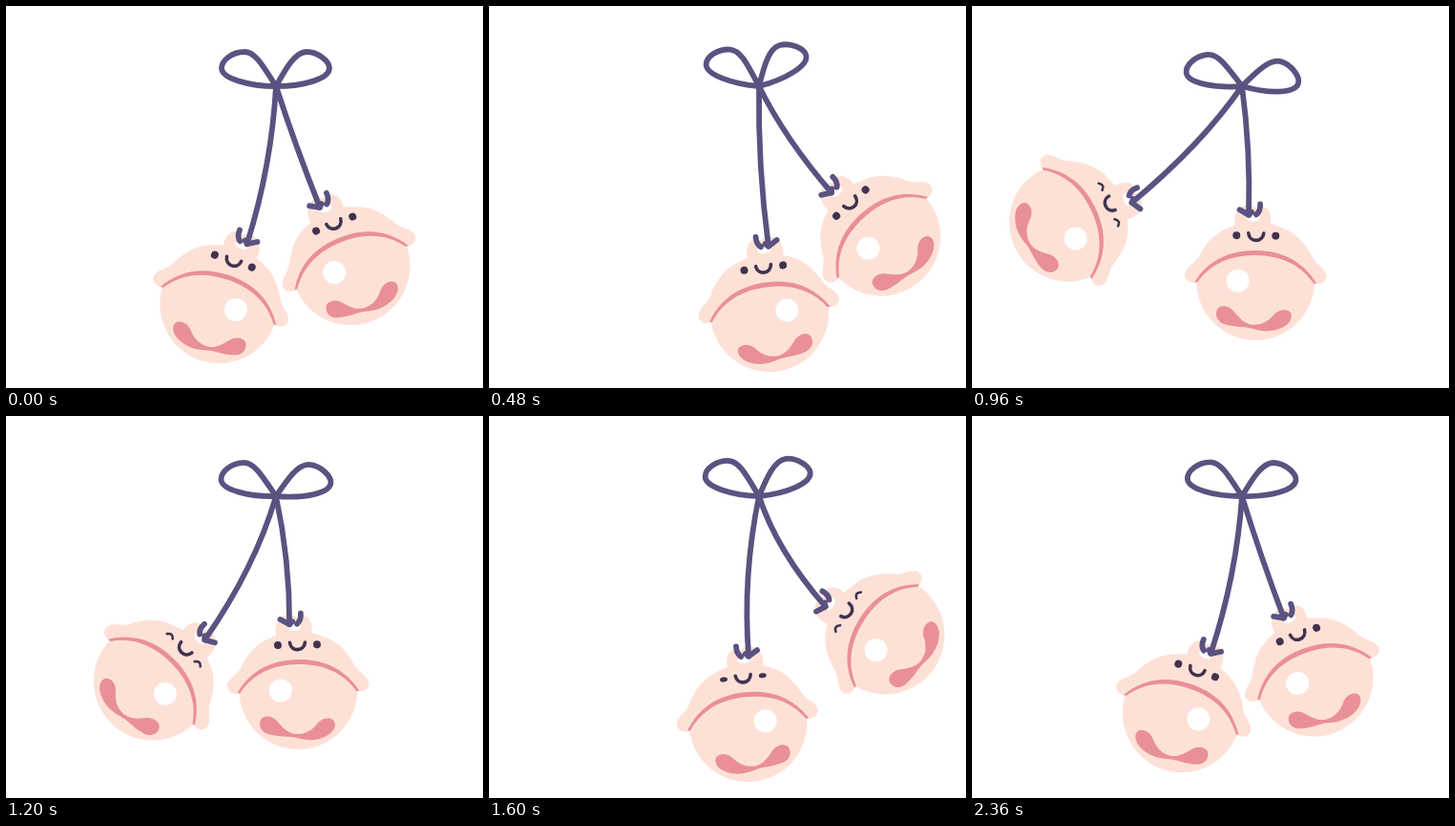
An HTML page for the animation above (2640 ms loop, 500 by 400 pixels).

```html
<!DOCTYPE html>
<html lang="en">
<head>
<meta charset="utf-8">
<title>Swinging bells</title>
<style>
  html, body { margin: 0; width: 100%; height: 100%; overflow: hidden; background: #fff; }
  svg { display: block; width: 100%; height: 100%; }
  .cord { fill: none; stroke: #5a5280; stroke-width: 5.8; stroke-linecap: round; stroke-linejoin: round; }
  .skin { fill: #fde1d7; }
  .pink { fill: #e98f98; }
  .ink { fill: #41334f; }
  .line { fill: none; stroke: #41334f; stroke-linecap: round; }
</style>
</head>
<body>
<svg id="stage" viewBox="0 0 500 400"></svg>
<script>
const LOOP = 2640, CYCLE = 2400, STEP = 40;
const KNOT = { x: 283, y: 84 };

// Key poses in degrees; every track has one value per key time.
const TIMES = [0, 480, 720, 1000, 1200, 1440, 1600, 1920];
const bells = [
  {
    side: 1, length: 168, shut: 900, open: 1520,
    swing: [10.4, -3.4, 18, 45, 26.4, 1, 3.7, 16.2],
    tilt: [18.4, -7.5, 25.5, 69, 45, 0, -6, 17.8]
  },
  {
    side: -1, length: 135, shut: 1400, open: 2040,
    swing: [-19.9, -34.3, -11, -2.5, -6, -33, -31.1, -13.3],
    tilt: [-21.3, -42, -14.5, 2, -1, -43, -58, -20.5]
  }
];
const bowSway = [0, -14.7, 23, 14, 5, -18, -6, 22];

// The left loop answers the right one, smaller and the other way.
const loops = [
  { share: -0.3, path: 'M0 0C-14 -22 -22 -36 -33 -36C-46 -36 -57 -27 -57 -19C-57 -8 -28 0 0 0' },
  { share: 1, path: 'M0 0C10 -18 20 -36 32 -36C44 -36 56 -26 56 -19C56 -8 30 0 0 0' }
];

// Smooth cyclic curve through the key poses.
function sample(values, t) {
  const n = TIMES.length;
  const key = i => {
    const turns = Math.floor(i / n), k = i - turns * n;
    return { t: TIMES[k] + turns * CYCLE, v: values[k] };
  };
  let i = 0;
  while (key(i + 1).t <= t) i++;
  const [a, b, c, d] = [-1, 0, 1, 2].map(j => key(i + j));
  const span = c.t - b.t, u = (t - b.t) / span;
  const m0 = (c.v - a.v) / (c.t - a.t) * span;
  const m1 = (d.v - b.v) / (d.t - b.t) * span;
  const u2 = u * u, u3 = u2 * u;
  return (2 * u3 - 3 * u2 + 1) * b.v + (u3 - 2 * u2 + u) * m0 +
         (3 * u2 - 2 * u3) * c.v + (u3 - u2) * m1;
}

const ramp = (t, from, length) => Math.min(1, Math.max(0, (t - from) / length));

const eye = x => `
  <ellipse class="ink eye" cx="${x}" cy="-47.5" rx="4"/>
  <path class="line lid" stroke-width="2.6" d="M${x - 4} -45.5Q${x} -51 ${x + 4} -46"/>`;

const bellArt = `
  <path class="skin" d="M-14 -56C-17 -65 -15 -71 -12 -75C-8 -79 -4 -77 0 -76
    C4 -80 13 -81 17 -76C22 -72 24 -66 22 -56Z"/>
  <path class="skin" d="M-63 2C-70 4 -76 -2 -74 -8C-72 -14 -65 -17 -60 -24
    C-53 -38 -44 -49 -30 -55Q-16 -60 0 -60Q16 -60 30 -55
    C44 -49 53 -38 60 -24C65 -17 72 -14 74 -8C76 -2 70 4 63 2Z"/>
  <circle class="skin" r="62"/>
  <path class="pink" d="M-64 2C-50 -21 -28 -32 0 -32C28 -32 50 -21 64 2
    L61 2C47 -18 26 -27 0 -27C-26 -27 -47 -18 -61 2Z"/>
  <circle cx="18.5" r="12" fill="#fff"/>
  <path class="pink" transform="rotate(-3)" d="M-38 30C-31 26 -24 30 -20 36
    C-14 43 -8 46 1 46C10 45 14 40 20 34C26 27 35 27 38 32
    C41 39 37 45 30 47C18 50 8 48 0 50C-12 53 -22 52 -31 47C-40 42 -42 34 -38 30Z"/>
  <ellipse cx="3" cy="-66" rx="7" ry="3.8" fill="#fff"/>
  ${eye(-20.5)}${eye(20.5)}
  <path class="line" stroke-width="3.6" d="M-8 -50C-7 -40 7 -40 8 -50"/>
  <path class="cord" d="M-4 -80.5Q-4.5 -73 0 -69.5M5 -72L8 -69L17.5 -74.5"/>`;

document.getElementById('stage').innerHTML =
  bells.map(() => `<g class="bell">${bellArt}</g>`).join('') +
  bells.map(() => '<path class="cord rope"/>').join('') +
  loops.map(l => `<path class="cord loop" d="${l.path}"/>`).join('');

const all = (selector, root = document) => [...root.querySelectorAll(selector)];
const bellNodes = all('.bell').map(node => ({
  node, eyes: all('.eye', node), lids: all('.lid', node)
}));
const ropeNodes = all('.rope');
const loopNodes = all('.loop');

function drawBell(bell, i, t) {
  const swing = sample(bell.swing, t), tilt = sample(bell.tilt, t);
  const angle = swing * Math.PI / 180;
  const x = KNOT.x - bell.length * Math.sin(angle);
  const y = KNOT.y + bell.length * Math.cos(angle);

  // The rope bows as far as the bell trails behind it.
  const bow = 16 * Math.tanh((tilt - swing) / 10);
  const cx = (KNOT.x + x) / 2 + bow, cy = (KNOT.y + y) / 2;
  ropeNodes[i].setAttribute('d', `M${KNOT.x} ${KNOT.y}Q${cx} ${cy} ${x} ${y}`);

  const { node, eyes, lids } = bellNodes[i];
  node.setAttribute('transform',
    `translate(${x} ${y}) rotate(${tilt}) scale(${bell.side} 1) translate(-8 69)`);

  const open = 1 - ramp(t, bell.shut, 80) + ramp(t, bell.open, 130);
  const shut = open < 0.35;
  eyes.forEach(e => e.setAttribute('ry', shut ? 0 : 4 * open));
  lids.forEach(l => l.setAttribute('visibility', shut ? 'visible' : 'hidden'));
}

function draw(time) {
  const t = Math.min(Math.floor((time % LOOP) / STEP) * STEP, CYCLE - STEP);
  const sway = sample(bowSway, t);
  bells.forEach((bell, i) => drawBell(bell, i, t));
  loops.forEach((l, i) => loopNodes[i].setAttribute('transform',
    `translate(${KNOT.x} ${KNOT.y}) rotate(${sway * l.share})`));
}

const start = performance.now();
function tick() {
  draw(Math.max(0, performance.now() - start));
  requestAnimationFrame(tick);
}
tick();
</script>
</body>
</html>
```
